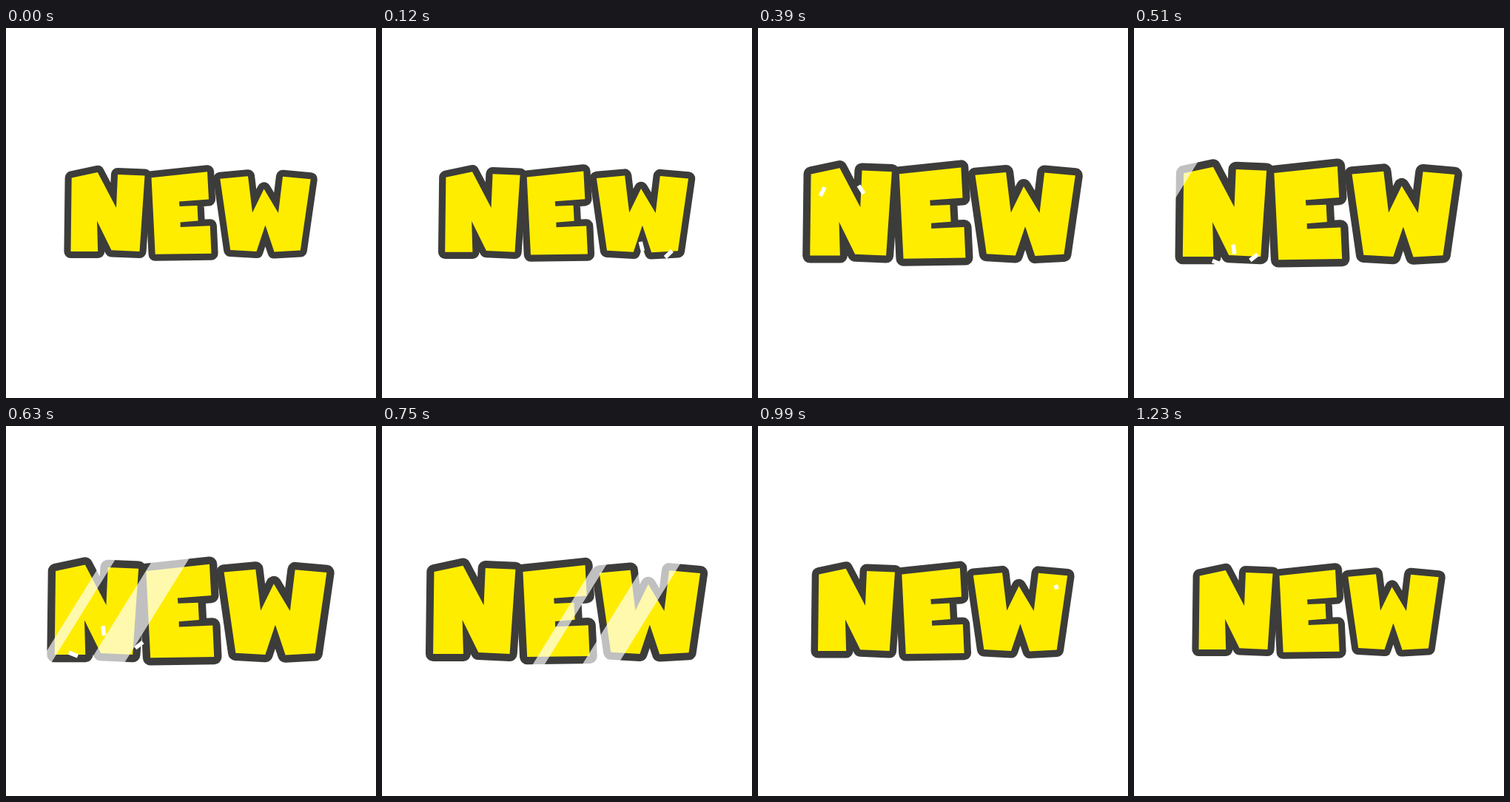
Write an HTML page with a canvas that moves like this. It is 500 px wide and 500 px high and loops after 1290 ms.

```html
<!DOCTYPE html>
<html lang="en">
<head>
<meta charset="utf-8">
<title>New</title>
<style>
  html, body { margin: 0; width: 100%; height: 100%; overflow: hidden; background: #fff; }
  canvas { display: block; width: 100vw; height: 100vh; }
</style>
</head>
<body>
<canvas id="stage" width="500" height="500"></canvas>
<script>
const ctx = document.getElementById('stage').getContext('2d');
const LOOP = 1290, STEP = 30, PEAK = 570, END = 1230, GROW = 0.137;
const BURST_TIME = 270, RAYS = 6, REACH = 55;

const sine = p => (1 - Math.cos(Math.PI * p)) / 2;

function shape(points) {
  const path = new Path2D();
  points.forEach(([x, y]) => path.lineTo(x, y));
  path.closePath();
  return path;
}

// Joins half an outline with its reflection
const mirrored = (half, reflect, tip = []) =>
  shape([...half, ...tip, ...half.map(reflect).reverse()]);

const nShape = shape([
  [87.5, 302], [88.7, 202.5], [123.8, 195], [149, 243], [151, 198],
  [187.5, 199.5], [180.5, 302], [142.5, 300.3], [123, 260.8], [124.2, 302]
]);

// Top half of the E, flipped down with a slight lean
const eShape = mirrored(
  [[196.5, 202.3], [272, 194.3], [274, 231.5], [234, 234.5], [234.5, 241], [258.5, 240]],
  ([x, y]) => {
    const low = 508 - 0.12 * (x - 197) - y;
    return [x + 0.05 * (low - y), low];
  }
);

// Left half of the W, flipped right around its peak
const wShape = mirrored(
  [[350.2, 267], [338.5, 302], [303.2, 300], [289.3, 203.7], [327, 200.3], [333, 249.5]],
  ([x, y]) => [701 - x, y + 0.5],
  [[348.6, 217.5]]
);

const letters = [nShape, eShape, wShape];

const bursts = [
  { x: 360, y: 332, angle: -44, start: 0 },
  { x: 111, y: 174.5, angle: 57, start: 180 },
  { x: 139, y: 328, angle: -38, start: 425 },
  { x: 389, y: 165, angle: 75, start: 747 }
];

function drawWord(t) {
  const scale = 1 + GROW * sine(t < PEAK ? t / PEAK : (END - t) / (END - PEAK));
  ctx.save();
  ctx.translate(250, 250);
  ctx.scale(scale, scale);
  ctx.translate(-250, -250);
  ctx.lineJoin = 'round';
  ctx.lineWidth = 18.2;
  ctx.strokeStyle = '#3c3c3b';
  letters.forEach(l => ctx.stroke(l));
  ctx.fillStyle = '#ffed00';
  letters.forEach(l => ctx.fill(l));
  ctx.restore();
}

function drawBurst({ x, y, angle, start }, t) {
  const p = (t - start) / BURST_TIME;
  if (p <= 0 || p >= 1) return;
  const r = REACH * (1 - (1 - p) ** 2);
  const half = 6.5 * Math.min(1, p / 0.2, (1 - p) / 0.22);
  ctx.strokeStyle = '#fff';
  ctx.lineWidth = 5.5;
  ctx.beginPath();
  for (let i = 0; i < RAYS; i++) {
    const a = angle * Math.PI / 180 + i * 2 * Math.PI / RAYS;
    const c = Math.cos(a), s = Math.sin(a);
    ctx.moveTo(x + c * (r - half), y + s * (r - half));
    ctx.lineTo(x + c * (r + half), y + s * (r + half));
  }
  ctx.stroke();
}

function drawBand(left, width) {
  const lean = 62, right = left + width;
  ctx.fill(shape([
    [left + lean, 150], [right + lean, 150], [right - lean, 350], [left - lean, 350]
  ]));
}

function drawShine(t) {
  const edge = 203.5 + (t - 630) * 4 / 3;
  ctx.fillStyle = 'rgba(255, 255, 255, 0.68)';
  drawBand(edge - 115, 16);
  drawBand(edge - 48, 48);
}

function draw(t) {
  ctx.fillStyle = '#fff';
  ctx.fillRect(0, 0, 500, 500);
  drawWord(t);
  bursts.forEach(b => drawBurst(b, t));
  drawShine(t);
}

let origin;
function tick(now) {
  origin ??= now;
  const t = (now - origin) % LOOP;
  draw(Math.min(END, Math.floor(t / STEP) * STEP));
  requestAnimationFrame(tick);
}
draw(0);
requestAnimationFrame(tick);
</script>
</body>
</html>
```
